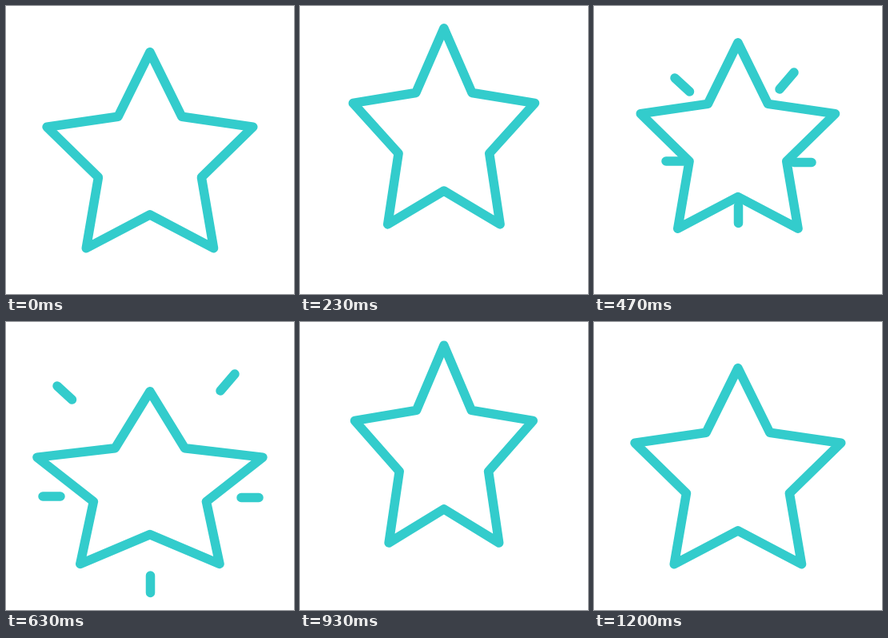
Animation of 360x360 px, one loop 1570 ms. Source, as an HTML page:

```html
<!DOCTYPE html>
<html lang="en">
<head>
<meta charset="utf-8">
<title>Jumping star</title>
<style>
  html, body { margin: 0; height: 100%; overflow: hidden; background: #fff; }
  svg { display: block; width: 100vw; height: 100vh; }
  svg * { stroke: #3cc; stroke-width: 11.5; stroke-linecap: round; stroke-linejoin: round; }
</style>
</head>
<body>
<svg viewBox="0 0 360 360">
  <path id="sparks" fill="none"/>
  <polygon id="star" fill="#fff"/>
</svg>
<script>
const LOOP = 1570, STEPS_PER_MS = 0.03;
const CENTER_X = 179.9, RADIUS = 135.5;
const star = document.getElementById('star');
const sparks = document.getElementById('sparks');

const rest = { y: 193.1, sx: 1, sy: 1 };
const leap = { y: 149.9, sx: 0.828, sy: 1 };
const squash = { y: 206, sx: 1.094, sy: 0.88 };
const hop = { y: 165.6, sx: 0.864, sy: 1.007 };
const keys = [[0, rest], [10.15, leap], [19, squash], [28, hop], [36, rest]];

// Each ray ends its flight at x, y and points along dx, dy
const SPARK_START = 11, SPARK_END = 19, SPEED = 0.4, FALL = 4.8;
const rays = [
  { x: 82.5, y: 97, dx: -18.5, dy: -17 },
  { x: 268, y: 86, dx: 18, dy: -21 },
  { x: 68, y: 218, dx: -22, dy: 0 },
  { x: 294, y: 219.5, dx: 22, dy: 0 },
  { x: 180.5, y: 317, dx: 0, dy: 21.5 }
];

const mix = (a, b, k) => a + (b - a) * k;

function poseAt(step) {
  const s = Math.min(step, 36);
  const i = keys.findIndex(([end], n) => n && s <= end);
  const [start, a] = keys[i - 1], [end, b] = keys[i];
  const k = (s - start) / (end - start);
  return { y: mix(a.y, b.y, k), sx: mix(a.sx, b.sx, k), sy: mix(a.sy, b.sy, k) };
}

function starPoints({ y, sx, sy }) {
  return Array.from({ length: 10 }, (_, i) => {
    const r = i % 2 ? RADIUS / 2 : RADIUS, angle = i * Math.PI / 5;
    return [CENTER_X + r * sx * Math.sin(angle), y - r * sy * Math.cos(angle)];
  }).join(' ');
}

function sparkPath(step) {
  if (step < SPARK_START || step > SPARK_END) return '';
  const age = step - SPARK_END;
  return rays.map(({ x, y, dx, dy }) =>
    `M${x + SPEED * dx * age} ${y + (SPEED * dy + FALL) * age}l${dx} ${dy}`).join('');
}

function draw() {
  const step = Math.floor((performance.now() % LOOP + 4) * STEPS_PER_MS);
  star.setAttribute('points', starPoints(poseAt(step)));
  sparks.setAttribute('d', sparkPath(step));
  requestAnimationFrame(draw);
}
draw();
</script>
</body>
</html>
```
